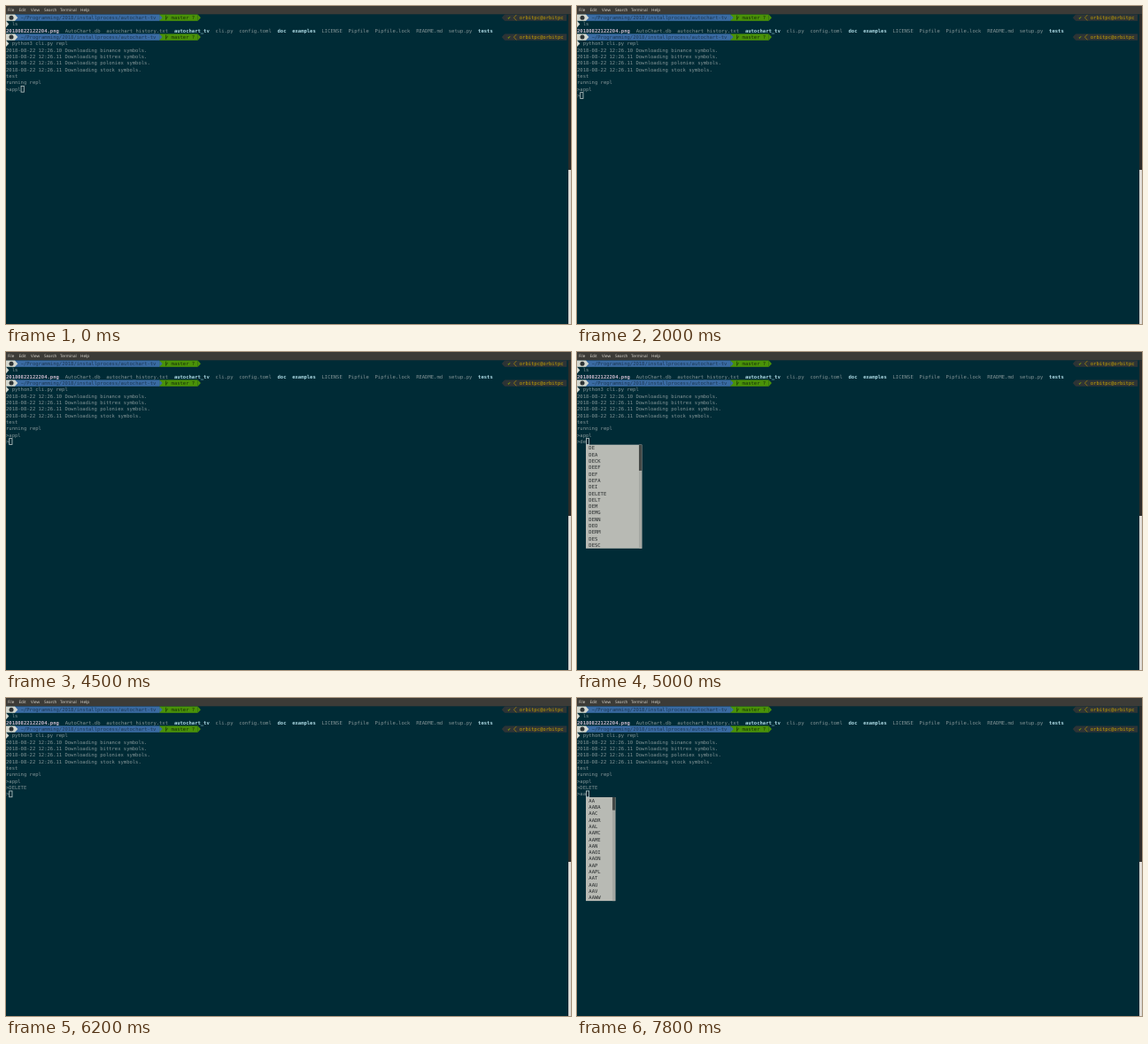
An HTML page that plays this animation: 638x359 px, repeating every 8 s.

```html
<!DOCTYPE html>
<html lang="en">
<head>
<meta charset="utf-8">
<title>Terminal session</title>
<style>
html, body { margin: 0; width: 100%; height: 100%; overflow: hidden; background: #002b36; }
svg { display: block; width: 638px; height: 359px; }
text { white-space: pre; text-rendering: geometricPrecision; }
.mono { font: 5.535px "DejaVu Sans Mono", monospace; }
.bar { font: 4.6px "Open Sans", sans-serif; fill: #dfdbd2; }
.bold { font-weight: bold; }
.step { visibility: hidden; animation: 8s step-end infinite; }
</style>
</head>
<body>
<svg id="stage" viewBox="0 0 638 359"></svg>
<script>
const W = 3.332, H = 7.32, TOP = 9.5, LOOP = 8000;
const FG = '#839496', DIR = '#a9d6e0', DARK = '#2e3436';
const px = col => (col * W).toFixed(2);
const py = row => (TOP + row * H).toFixed(2);

const rect = (x, y, w, h, fill) =>
  `<rect x="${x}" y="${y}" width="${w}" height="${h}" fill="${fill}"/>`;
const cells = (col, row, w, h, fill) => rect(px(col), py(row), px(w), (h * H).toFixed(2), fill);
const text = (col, row, str, fill = FG, cls = '') =>
  `<text class="mono ${cls}" x="${px(col)}" y="${(TOP + row * H + 5.6).toFixed(2)}" fill="${fill}">${
    str.replace(/</g, '&lt;').replace(/>/g, '&gt;')}</text>`;
// Triangle one cell wide; dir -1 points left
const arrow = (col, row, fill, dir = 1) =>
  `<path d="M${px(dir > 0 ? col : col + 1)} ${py(row)}l${dir * W} ${H / 2}l${-dir * W} ${H / 2}z" fill="${fill}"/>`;

function promptBar(row) {
  const white = '#d3d7cf', blue = '#3a6ba3', green = '#4a9208', gold = '#c4a000';
  const mid = TOP + (row + 0.5) * H;
  return cells(3, row, 49, 1, blue) + cells(0, row, 3, 1, white) + arrow(3, row, white)
    + `<circle cx="6" cy="${mid}" r="2.5" fill="${DARK}"/>`
    + text(5, row, '~/Programming/2018/installprocess/autochart-tv', '#1b3854')
    + cells(52, row, 13, 1, green) + arrow(52, row, blue) + arrow(65, row, green)
    + `<path d="M180.6 ${mid - 2.5}v5m0-1.2q1.8-.5 1.8-2.6" fill="none" stroke="#16300a" stroke-width=".7"/>`
    + text(56, row, 'master ?', '#16300a')
    + arrow(168, row, DARK, -1) + cells(169, row, 21, 1, DARK)
    + text(170, row, '✔', '#8aa300')
    + `<path d="M${px(173)} ${mid - 3.2}l-3 3.2l3 3.2" fill="none" stroke="${gold}" stroke-width=".6"/>`
    + text(174, row, 'orbitpc@orbitpc', gold);
}

function fileList(row) {
  const bold = { autochart_tv: DIR, doc: DIR, examples: DIR, tests: DIR, '20180822122204.png': '#c9b9cc' };
  const names = '20180822122204.png AutoChart.db autochart_history.txt autochart_tv cli.py config.toml '
    + 'doc examples LICENSE Pipfile Pipfile.lock README.md setup.py tests';
  let col = 0, out = '';
  for (const name of names.split(' ')) {
    out += text(col, row, name, bold[name] || FG, bold[name] ? 'bold' : '');
    col += name.length + 2;
  }
  return out;
}

const command = (row, str) => arrow(0, row, '#d3d7cf') + text(2, row, str);

function backdrop() {
  const bar = [['File', 2], ['Edit', 14.5], ['View', 28], ['Search', 43], ['Terminal', 61], ['Help', 84]];
  const log = ['10 Downloading binance', '11 Downloading bittrex', '11 Downloading poloniex', '11 Downloading stock'];
  return rect(0, 0, 638, 359, '#002b36') + rect(0, 0, 638, 9.3, '#3c3b37')
    + bar.map(([s, x]) => `<text class="bar" x="${x}" y="6.4">${s}</text>`).join('')
    + rect(635, 9.3, 3, 176, '#2d2c29') + rect(635, 185, 3, 174, '#dcdad5')
    + promptBar(0) + command(1, 'ls') + fileList(2)
    + promptBar(3) + command(4, 'python3 cli.py repl')
    + log.map((s, i) => text(0, 5 + i, `2018-08-22 12:26.${s} symbols.`)).join('')
    + text(0, 9, 'test') + text(0, 10, 'running repl');
}

// Completion lists: words, width in cells, scroll thumb rows
const menus = {
  c: ['C C+A C-C C-J C-K C-L C-N C-S CA CAAP CAAS CABO CAC CACC CACG CACI', 22, 2],
  ce: ['CE CECE CECO CEE CEF CEI CEL CELG CELH CELP CEM CEMI CEN CENT CENX CEO', 19, 4],
  d: ['D DAC DAIO DAKT DAL DAN DAR DARE DASH DATA DAX DB DBA DBB DBC DBD', 20, 2],
  de: ['DE DEA DECK DEEF DEF DEFA DEI DELETE DELT DEM DEMG DENN DEO DERM DES DESC', 19, 4],
  del: ['DELETE DELT', 8, 0],
  dele: ['DELETE', 8, 0],
  a: ['A AA AABA AAC AADR AAL AAMC AAME AAN AAOI AAON AAP AAPL AAT AAU AAV', 22, 2],
  aa: ['AA AABA AAC AADR AAL AAMC AAME AAN AAOI AAON AAP AAPL AAT AAU AAV AAWW', 10, 2]
};

function menu(key, row, picked) {
  const [list, width, thumb] = menus[key], words = list.split(' '), col = key.length + 1;
  let out = cells(col, row, width, words.length, picked ? '#838683' : '#b8bab4');
  if (thumb) {
    out += cells(col + width - 1, row, 1, words.length, '#a5a8a3')
      + cells(col + width - 1, row, 1, thumb, '#444846');
  }
  return out + words.map((w, i) => text(col + 1, row + i, w, picked ? '#fff' : '#25292a')).join('');
}

function input(row, typed, key = typed) {
  return text(0, row, '>' + typed)
    + (menus[key] ? menu(key, row + 1, key !== typed) : '')
    + `<rect x="${(typed.length + 1) * W + 0.4}" y="${TOP + row * H + 0.3}" width="${W - 0.1}" height="${H - 0.5}"
        fill="none" stroke="#c3cccb" stroke-width=".8"/>`;
}

// Start time, row, typed text, menu key when it differs
const steps = [
  [0, 11, 'appl'], [1800, 12, ''],
  [3400, 12, 'c'], [3500, 12, 'ce'], [3900, 12, 'c'], [4500, 12, ''],
  [4600, 12, 'd'], [5000, 12, 'de'], [5100, 12, 'del'], [5200, 12, 'dele'],
  [6000, 12, 'DELETE', 'dele'], [6200, 13, ''],
  [7500, 13, 'a'], [7800, 13, 'aa']
];

let rules = '';
function timed(name, from, to, body) {
  const pct = t => t / LOOP * 100 + '%';
  rules += `@keyframes ${name}{${from ? '0%{visibility:hidden}' : ''}${pct(from)}{visibility:visible}`
    + `${to < LOOP ? pct(to) + '{visibility:hidden}100%{visibility:hidden}' : '100%{visibility:visible}'}}`;
  return `<g class="step" style="animation-name:${name}">${body}</g>`;
}

const stage = document.getElementById('stage');
stage.innerHTML = backdrop()
  + timed('first', 1800, LOOP, text(0, 11, '>appl'))
  + timed('second', 6200, LOOP, text(0, 12, '>DELETE'))
  + steps.map(([from, ...args], i) =>
      timed('type' + i, from, i + 1 < steps.length ? steps[i + 1][0] : LOOP, input(...args))).join('');
document.head.appendChild(document.createElement('style')).textContent = rules;
</script>
</body>
</html>
```
